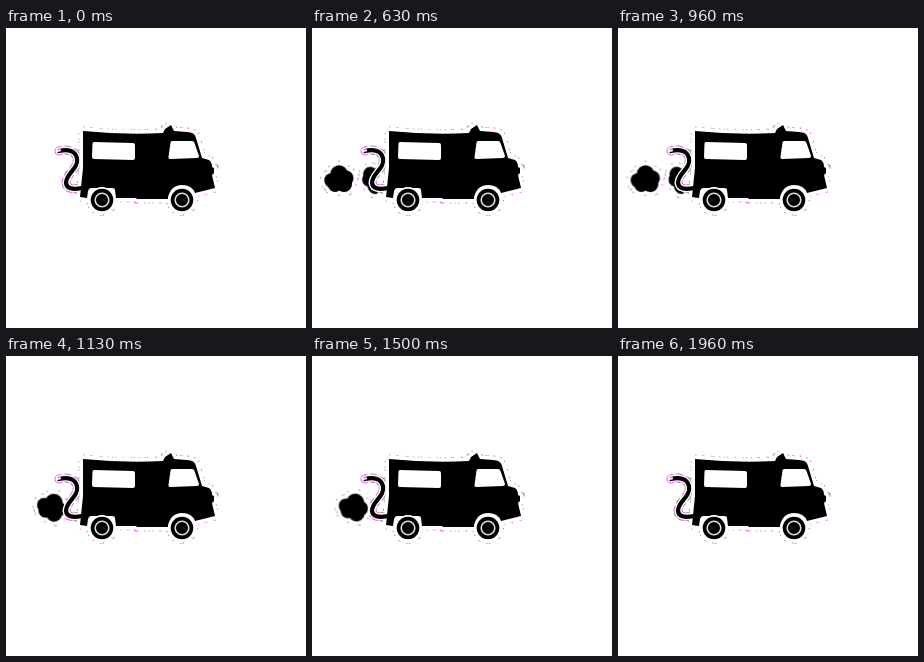
Animation, 300 px wide and 300 px high, one loop 2 s. Source, as an HTML page:

```html
<!DOCTYPE html>
<html lang="en">
<head>
<meta charset="utf-8">
<title>Puffing van</title>
<style>
  html, body { margin: 0; width: 100%; height: 100%; overflow: hidden; background: #fff; }
  svg { display: block; width: 100vw; height: 100vh; }

  .tail { fill: none; stroke-linecap: round; }
  .halo { stroke: #fff; stroke-width: 7; stroke-linejoin: round; fill: #fff; }
  .halo .tail { stroke-width: 8.5; fill: none; }

  /* sparse specks just outside the white rim */
  .fringe { fill: none; stroke-width: 9; }
  .fringe .tail { stroke-width: 13; stroke-linecap: butt; }
  .pink { stroke: #f4f; stroke-dasharray: 1 7; }
  .grey { stroke: #999; stroke-dasharray: 1 10; stroke-dashoffset: 4; }

  .puff {
    transform: scale(0);
    animation: drift 2s linear calc(var(--i) * 333.3ms) infinite;
  }
  .puff.last { animation-name: fizzle; }

  @keyframes drift {
    0%        { transform: translate(97.6px, 151px) rotate(95deg) scale(1); }
    34.5%     { transform: translate(20.5px, 151px) rotate(-8.5deg) scale(1); }
    39.5%, to { transform: translate(12px, 151px) rotate(-20deg) scale(0); }
  }
  @keyframes fizzle {
    0%      { transform: translate(97.6px, 151px) rotate(95deg) scale(1); }
    25.5%   { transform: translate(40.6px, 151px) rotate(18.5deg) scale(1); }
    32%, to { transform: translate(36px, 151px) rotate(5deg) scale(0); }
  }
</style>
</head>
<body>
<svg viewBox="0 0 300 300">
  <defs>
    <path id="body" d="M77 103Q118 107 157 105L159 101L165 97L168 103L181 104Q189 104 190 110L196 130L203 132Q206 134 206 139L208 140V145L206 147L209 160L201 162L189 165Q186 157 176 157Q164 157 162 171L131 171L130 170H110L109 162Q109 160 106 160H85Q83 160 82 163L81 170L74 169L77 140Z"/>
    <path id="tail" class="tail" d="M53 123C61 121 69 122 71 130C73 141 60 145 60 155Q61 163 76 160"/>
    <g id="wheels">
      <circle cx="96" cy="172" r="11.3"/>
      <circle cx="176" cy="172" r="11.3"/>
    </g>
    <g id="outline">
      <use href="#body"/>
      <use href="#tail"/>
      <use href="#wheels"/>
    </g>
    <g id="lobes">
      <circle cx="0" cy="-5" r="8.7"/>
      <circle cx="-7.5" cy="1.5" r="7.3"/>
      <circle cx="7" cy="-1" r="7.5"/>
      <circle cx="5" cy="5" r="8"/>
      <circle cx="-4" cy="6" r="7"/>
    </g>
    <g id="cloud">
      <use href="#lobes" class="fringe pink"/>
      <use href="#lobes" class="fringe grey"/>
      <use href="#lobes" class="halo"/>
      <use href="#lobes"/>
    </g>
    <clipPath id="behind">
      <path d="M0 100H72V132L66 143L60 152L61 160L66 165L60 172H0Z"/>
    </clipPath>
  </defs>

  <g class="fringe pink"><use href="#outline"/></g>
  <g class="fringe grey"><use href="#outline"/></g>

  <g clip-path="url(#behind)">
    <use href="#cloud" class="puff" style="--i:0"/>
    <use href="#cloud" class="puff" style="--i:1"/>
    <use href="#cloud" class="puff" style="--i:2"/>
    <use href="#cloud" class="puff last" style="--i:3"/>
  </g>

  <g class="halo"><use href="#outline"/></g>

  <use href="#body"/>
  <use href="#tail" stroke="#000" stroke-width="4.2"/>
  <path d="M51 122.8L54 122.4" stroke="#fff" stroke-width="2.2" stroke-linecap="round"/>
  <g fill="#fff">
    <path d="M88 114L127 115Q129 115 129 117V130Q129 132 127 132L88 131Q86 131 86 129L86.500 115.500Q86.500 114 88 114Z"/>
    <path d="M166 113H186Q188 113 188.500 115L193 128Q193 130 191 130L164 131Q162 131 162.500 129L164.500 114.500Q165 113 166 113Z"/>
    <circle cx="96" cy="172" r="13"/>
    <circle cx="176" cy="172" r="14"/>
  </g>
  <use href="#wheels"/>
  <g fill="none" stroke="#ddd" stroke-width="1.6">
    <circle cx="96" cy="172" r="6.800"/>
    <circle cx="176" cy="172" r="6.800"/>
  </g>
</svg>
</body>
</html>
```
